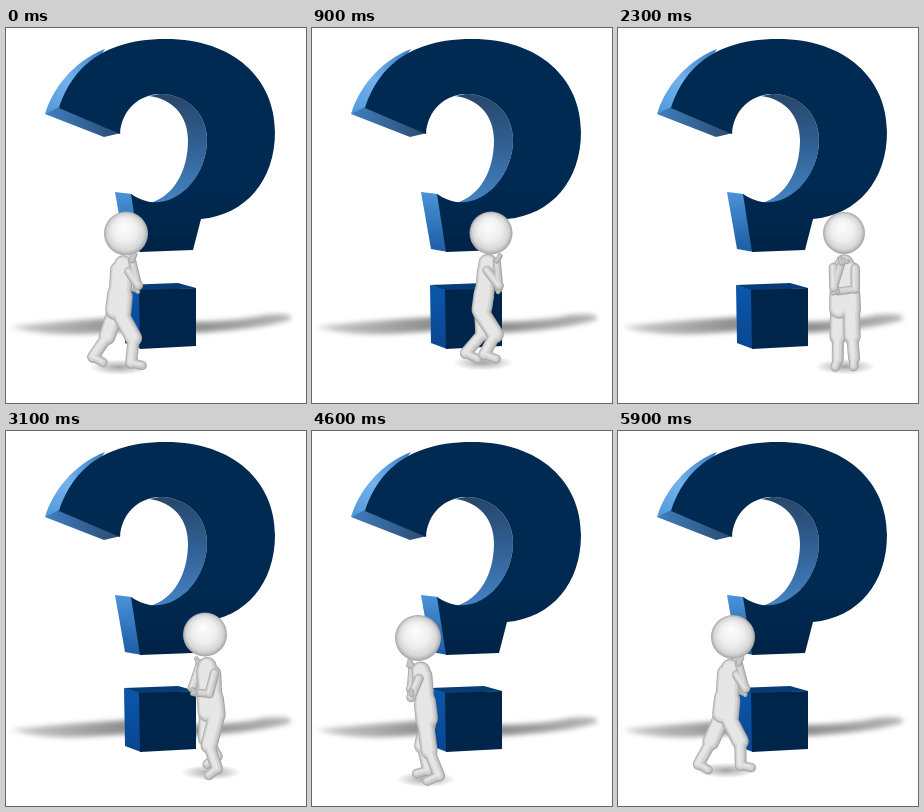
An HTML page with a canvas for the animation above (6000 ms loop, 300 by 375 pixels).

```html
<!DOCTYPE html>
<html lang="en">
<head>
<meta charset="utf-8">
<title>Pacing thinker</title>
<style>
  html, body { margin: 0; width: 100%; height: 100%; overflow: hidden; background: #fff; }
  svg, canvas { position: absolute; left: 0; top: 0; width: 300px; height: 375px; }
</style>
</head>
<body>
<svg viewBox="0 0 300 375">
  <defs>
    <linearGradient id="rim" x1="0" y1="1" x2="1" y2="0">
      <stop offset="0" stop-color="#4f97da"/><stop offset=".45" stop-color="#74b2ec"/><stop offset="1" stop-color="#3a7fc4"/>
    </linearGradient>
    <linearGradient id="cut">
      <stop offset="0" stop-color="#3f7fc0"/><stop offset="1" stop-color="#2b4a6e"/>
    </linearGradient>
    <linearGradient id="inner" x1="0" y1="0" x2="0" y2="1">
      <stop offset="0" stop-color="#27466a"/><stop offset=".45" stop-color="#305f92"/><stop offset="1" stop-color="#4584c4"/>
    </linearGradient>
    <linearGradient id="stem" x1="0" y1="0" x2="0" y2="1">
      <stop offset="0" stop-color="#4b93d8"/><stop offset="1" stop-color="#1c5ca4"/>
    </linearGradient>
    <linearGradient id="side" x1="0" y1="0" x2="0" y2="1">
      <stop offset="0" stop-color="#0b57ac"/><stop offset="1" stop-color="#0a4690"/>
    </linearGradient>
    <linearGradient id="face" x1="0" y1="0" x2="0" y2="1">
      <stop offset=".7" stop-color="#002a52"/><stop offset="1" stop-color="#002347"/>
    </linearGradient>
    <linearGradient id="fadeL"><stop offset="0" stop-color="#ccc"/><stop offset="1" stop-color="#8c8c8c"/></linearGradient>
    <linearGradient id="fadeR"><stop offset="0" stop-color="#8c8c8c"/><stop offset="1" stop-color="#b5b5b5"/></linearGradient>
    <filter id="soft" x="-10%" y="-60%" width="120%" height="220%"><feGaussianBlur stdDeviation="2.6"/></filter>
  </defs>
  <g filter="url(#soft)">
    <path fill="url(#fadeL)" d="M4 299Q40 294 122 289V303Q65 308 38 305Q20 303 4 299Z"/>
    <path fill="url(#fadeR)" d="M185 305V294Q235 293 258 287Q290 284 284 292Q250 302 185 305Z"/>
  </g>
  <path fill="url(#rim)" d="M39 86C46 62 66 34 99 21L80 50L54 81Z"/>
  <path fill="url(#cut)" d="M39 86L53 79L115 105L98 109Z"/>
  <path fill="url(#inner)" d="M154 66C180 66 201 85 201 112C201 147 173 178 144 175C168 168 182 143 182 112C182 89 168 71 143 68Z"/>
  <path fill="url(#stem)" d="M109 164L126 166L136 224L119 221Z"/>
  <path fill="url(#face)" d="M53 80C62 53 84 11 160 11C228 11 269 51 269 104C269 152 240 187 195 191L187 222L134 224L125 166Q134 172 144 174C173 178 201 147 201 112C201 85 180 66 154 66C134 66 115 82 114 106Z"/>
  <path fill="#083c76" d="M118 257L172 255L190 260L134 263Z"/>
  <path fill="url(#side)" d="M118 257L134 262L135 321L119 315Z"/>
  <path fill="#00254a" d="M133 262L190 260V318L134 321Z"/>
</svg>
<canvas id="stage"></canvas>
<script>
const canvas = document.getElementById('stage');
const ctx = canvas.getContext('2d');
const dpr = window.devicePixelRatio || 1;
canvas.width = 300 * dpr;
canvas.height = 375 * dpr;

const LOOP = 6000, STEP = 100;

// time, head x, head y, head radius, ground y, heading in degrees, stride
const KEYS = [
  [0,    120, 205.5, 22,   338, -30, 1],
  [900,  179, 205,   21.5, 335,   5, 1],
  [1500, 214, 204.5, 21,   335,  38, .6],
  [1900, 228, 204.5, 21,   338,  68, .25],
  [2300, 226, 205,   21,   341,  97, .1],
  [2700, 217, 204,   21.5, 342, 117, .4],
  [3100, 199, 203.5, 22,   343, 138, .7],
  [3900, 149, 205,   23,   347, 165, .8],
  [4600, 106, 207,   23,   348, 190, .4],
  [5100,  83, 207,   23,   343, 245, .4],
  [5500,  92, 206,   22.5, 340, 300, .7],
  [5900, 115, 206,   22,   338, 326, 1],
];

// smooth, loop-aware interpolation between keys
function keyAt(i) {
  const n = KEYS.length, turn = Math.floor(i / n), key = KEYS[i - turn * n].slice();
  key[0] += turn * LOOP;
  key[5] += turn * 360;
  return key;
}

function poseAt(t) {
  let i = KEYS.length - 1;
  while (KEYS[i][0] > t) i--;
  const [a, b, c, d] = [-1, 0, 1, 2].map(k => keyAt(i + k));
  const span = c[0] - b[0], u = (t - b[0]) / span;
  return b.map((v, k) => {
    const m0 = (c[k] - a[k]) / (c[0] - a[0]) * span;
    const m1 = (d[k] - b[k]) / (d[0] - b[0]) * span;
    return v + u * (m0 + u * (3 * (c[k] - v) - 2 * m0 - m1 + u * (2 * (v - c[k]) + m0 + m1)));
  });
}

// inset from the outline, colour
const SHADES = [[0, '#a6a6a6'], [.9, '#c2c2c2'], [2.1, '#d6d6d6'], [3.8, '#e6e6e6']];

// each segment is [from, to, width]; shades are stacked so segments merge
function limb(segments) {
  ctx.lineCap = 'round';
  for (const [inset, color] of SHADES) {
    ctx.strokeStyle = color;
    for (const [p, q, width] of segments) {
      if (width <= inset * 2) continue;
      const shift = inset * .3;
      ctx.lineWidth = width - inset * 2;
      ctx.beginPath();
      ctx.moveTo(p.x - shift, p.y - shift);
      ctx.lineTo(q.x - shift + .01, q.y - shift);
      ctx.stroke();
    }
  }
}

function ball(x, y, r) {
  const g = ctx.createRadialGradient(x - r * .1, y - r * .3, r * .1, x, y, r);
  g.addColorStop(0, '#fbfbfb');
  g.addColorStop(.5, '#eee');
  g.addColorStop(.82, '#d6d6d6');
  g.addColorStop(1, '#a4a4a4');
  ctx.fillStyle = g;
  ctx.beginPath();
  ctx.arc(x, y, r, 0, 7);
  ctx.fill();
}

function groundShadow({ x, y }) {
  ctx.save();
  ctx.translate(x, y);
  ctx.scale(1, .26);
  const g = ctx.createRadialGradient(0, 0, 0, 0, 0, 30);
  g.addColorStop(0, 'rgba(90,90,90,.55)');
  g.addColorStop(1, 'rgba(90,90,90,0)');
  ctx.fillStyle = g;
  ctx.fillRect(-30, -30, 60, 60);
  ctx.restore();
}

function draw(t) {
  const [, headX, headY, headR, ground, heading, stride] = poseAt(t);
  const yaw = heading * Math.PI / 180, cos = Math.cos(yaw), sin = Math.sin(yaw);
  const size = (ground - headY) / 133;
  const phase = t / 1200 * 2 * Math.PI + Math.PI / 6;

  // body space: forward, to the right-hand side, up
  const at = (f, s, u) => {
    const depth = f * sin + s * cos;
    return { x: headX + f * cos - s * sin, y: ground - u * size + depth * .3, depth };
  };

  const leg = side => {
    const swing = Math.cos(phase) * side * stride;
    const lift = Math.max(0, -Math.sin(phase) * side) * 7 * stride;
    const heel = Math.max(0, -swing) * 4;
    const bend = Math.sin(phase) ** 2 * 10 * stride;
    const ankle = -16 + swing * 20;
    const hip = at(-9, side * 6.5, 53);
    const knee = at(-9 + swing * 13 + bend, side * 7, 29 + lift * .4);
    const foot = at(ankle, side * 8, 5 + lift + heel);
    const toe = at(ankle + 12, side * 9, 1 + lift);
    return [[hip, knee, 17], [knee, foot, 12], [foot, toe, 9.5]];
  };

  const torso = [-1, 1].flatMap(side => {
    const waist = at(-7, side * 5.5, 72);
    return [[at(-9, side * 6, 56), waist, 20], [waist, at(-5, side * 6, 96), 17]];
  });
  torso.push([at(-7, 0, 66), at(-3, 0, 102), 19]);
  const nearSide = cos > 0 ? 1 : -1;

  const elbow = at(9, 9, 82), chin = at(6, 2, 105);
  const thinkingArm = [[at(-3, 11, 98), elbow, 9.5], [elbow, chin, 8]];
  const fingers = [-5, -1, 3].map(s => [chin, at(9, s, 110 + s * .4), 4.5]);
  const bend = at(5, -12, 80), tucked = at(8, 5, 78);
  const foldedArm = [[at(-3, -11, 98), bend, 9.5], [bend, tucked, 8]];
  const grip = [0, 4].map(k => [tucked, at(8, 10, 76 + k), 4.5]);

  const parts = [
    { depth: -40, draw: () => limb(leg(-nearSide)) },
    { depth: 0, draw: () => limb([...torso, ...leg(nearSide)]) },
    { depth: .1, draw: () => ball(headX, headY, headR) },
    { depth: elbow.depth * .8 + chin.depth * .2, draw: () => { limb(thinkingArm); limb(fingers); } },
    { depth: bend.depth * .6 + tucked.depth * .4, draw: () => { limb(foldedArm); limb(grip); } },
  ];

  ctx.setTransform(dpr, 0, 0, dpr, 0, 0);
  ctx.clearRect(0, 0, 300, 375);
  groundShadow(at(-8, 0, 0));
  parts.sort((a, b) => a.depth - b.depth).forEach(part => part.draw());
}

function tick() {
  draw(Math.floor(performance.now() % LOOP / STEP) * STEP);
  requestAnimationFrame(tick);
}
tick();
</script>
</body>
</html>
```
